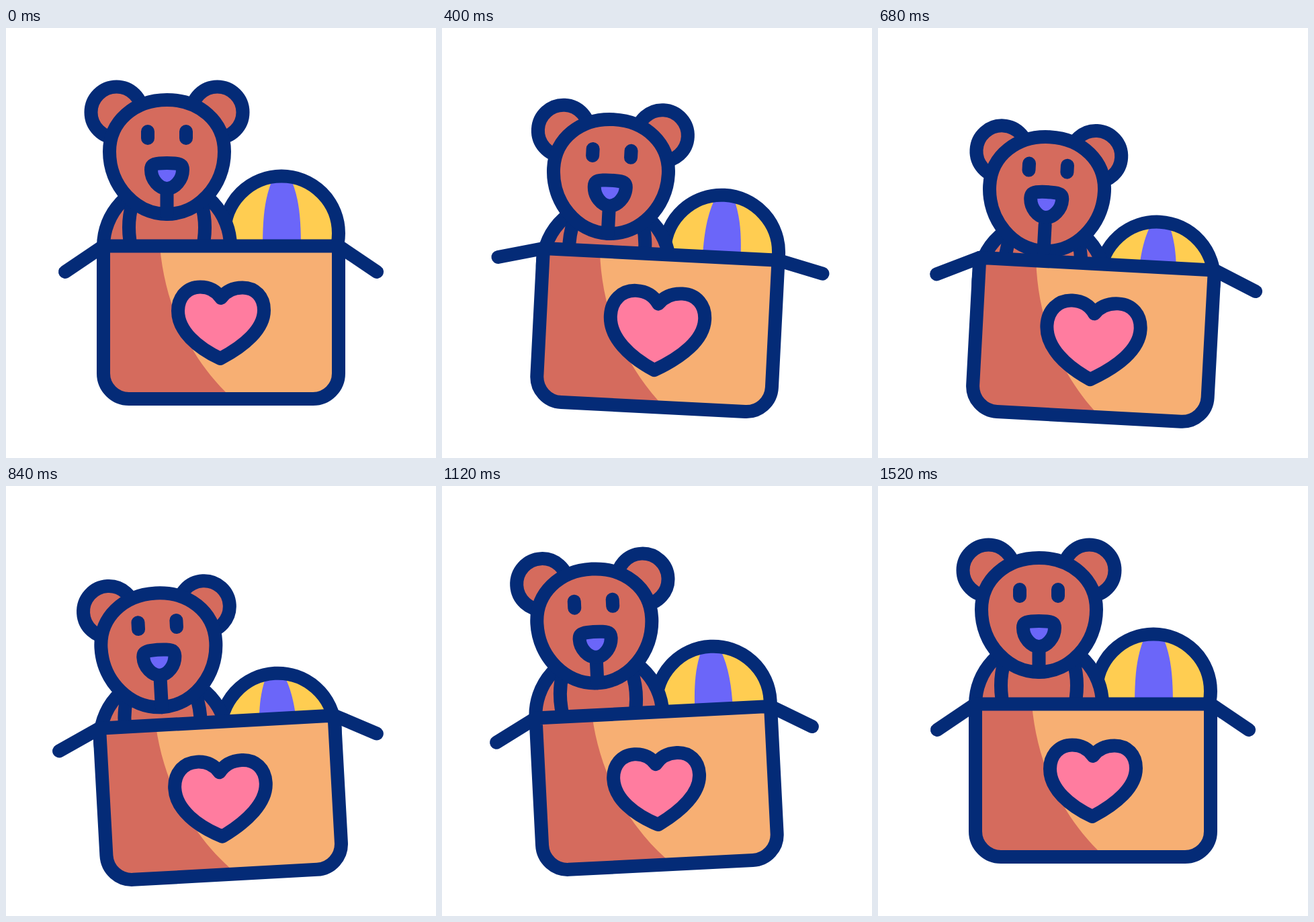
An HTML page without scripts for the animation above (1.6 s loop, 640 by 640 pixels).

```html
<!DOCTYPE html>
<html lang="en">
<head>
<meta charset="utf-8">
<title>Toy box</title>
<style>
  html, body { margin: 0; height: 100%; overflow: hidden; background: #fff; }
  svg { display: block; width: 100%; height: 100%; }

  .line { fill: none; stroke: #042b77; stroke-width: 20; stroke-linecap: round; stroke-linejoin: round; }
  .brown { fill: #d56b5d; }
  .orange { fill: #f7af73; }
  .yellow { fill: #ffcd51; }
  .purple { fill: #6b66f9; }
  .pink { fill: #ff7c9f; }

  .toybox, .bear, .ear, .eyes, .nose, .ball, .flap, .heart { animation: 1600ms ease-in-out infinite; }
  .toybox {
    transform-origin: 320px 438px;
    animation-name: tilt, drop;
    animation-timing-function: ease-in-out, cubic-bezier(.45, 0, .55, 1);
  }
  .bear { animation-name: bear-sink; }
  .ear, .eyes, .nose { animation-name: look-up; }
  .ear { --shift: 5px 6.5px; }
  .eyes { --shift: 0 -6px; }
  .nose { --shift: 0 -12px; }
  .ball { animation-name: ball-sink; }
  .flap { transform-origin: 145px 324.5px; animation-name: flap; }
  .heart { transform-origin: 320px 439px; animation-name: beat; vector-effect: non-scaling-stroke; }

  @keyframes tilt {
    0%, 5%, 90%, 100% { rotate: 0deg; }
    37.5% { rotate: 4.2deg; }
    57.5% { rotate: -4.2deg; }
  }
  @keyframes drop {
    0%, 5%, 90%, 100% { translate: 0 0; }
    47.5% { translate: 0 27.2px; }
  }
  @keyframes bear-sink {
    0%, 5%, 70%, 100% { translate: 0 0; }
    40% { translate: 0 33px; }
  }
  @keyframes look-up {
    0%, 15%, 75%, 100% { translate: 0 0; }
    42.5% { translate: var(--shift); }
  }
  @keyframes ball-sink {
    0%, 11.5%, 83%, 100% { translate: 0 0; }
    47.5% { translate: 0 38px; }
  }
  @keyframes flap {
    0%, 7%, 35%, 61.5%, 82%, 100% { rotate: 0deg; }
    23% { rotate: 21.5deg; }
    46% { rotate: 12.5deg; }
    72% { rotate: 5.5deg; }
  }
  @keyframes beat {
    0%, 5%, 31.5%, 61%, 100% { scale: 1; }
    17% { scale: 1.24; }
    46% { scale: 1.1; }
  }
</style>
</head>
<body>
<svg viewBox="0 0 640 640">
  <g class="toybox">
    <g class="ball">
      <circle class="yellow" cx="410" cy="305.5" r="85"/>
      <path class="purple" d="M399 220C384 252 382 285 382 330H439C439 285 437 252 422 220Z"/>
      <circle class="line" cx="410" cy="305.5" r="85"/>
    </g>

    <g class="bear">
      <circle class="line brown" cx="239.5" cy="325" r="94.5"/>
      <path class="line" d="M188 262Q178 295 188 335M291 262Q301 295 291 335"/>
      <circle class="line brown ear" cx="164.5" cy="125.5" r="38"/>
      <g transform="matrix(-1 0 0 1 479 0)">
        <circle class="line brown ear" cx="164.5" cy="125.5" r="38"/>
      </g>
      <path class="line brown" d="M239.5 107C288 107 325 139 325 184C325 235 286 277 239.5 277S154 235 154 184C154 139 191 107 239.5 107Z"/>
      <path class="line eyes" d="M211 154V164M268 154V164"/>
      <path class="line" d="M239.5 238V277"/>
      <path class="line purple nose" d="M216 211C216 203 221 202 228 201.5Q239.5 200.5 251 201.5C258 202 263 203 263 211C263 226 251 239 239.5 239S216 226 216 211Z"/>
    </g>

    <path class="line flap" d="M145 324.5L88 363"/>
    <g transform="matrix(-1 0 0 1 640 0)">
      <path class="line flap" d="M145 324.5L88 363"/>
    </g>

    <path class="orange" d="M145 324.5H495V514A38 38 0 0 1 457 552H183A38 38 0 0 1 145 514Z"/>
    <path class="brown" d="M145 324.5H229C236 410 272 487 327 542L337 552H183A38 38 0 0 1 145 514Z"/>
    <path class="line" d="M145 324.5H495V514A38 38 0 0 1 457 552H183A38 38 0 0 1 145 514Z"/>
    <path class="line heart pink" d="M320 402C313 391 302 385.5 289 385.5C270 385.5 256 400 256 421C256 451 285 476 319 492C355 473 384 448 384 420C384 400 371 386.5 352 386.5C338 386.5 327 392 320 402Z"/>
  </g>
</svg>
</body>
</html>
```
